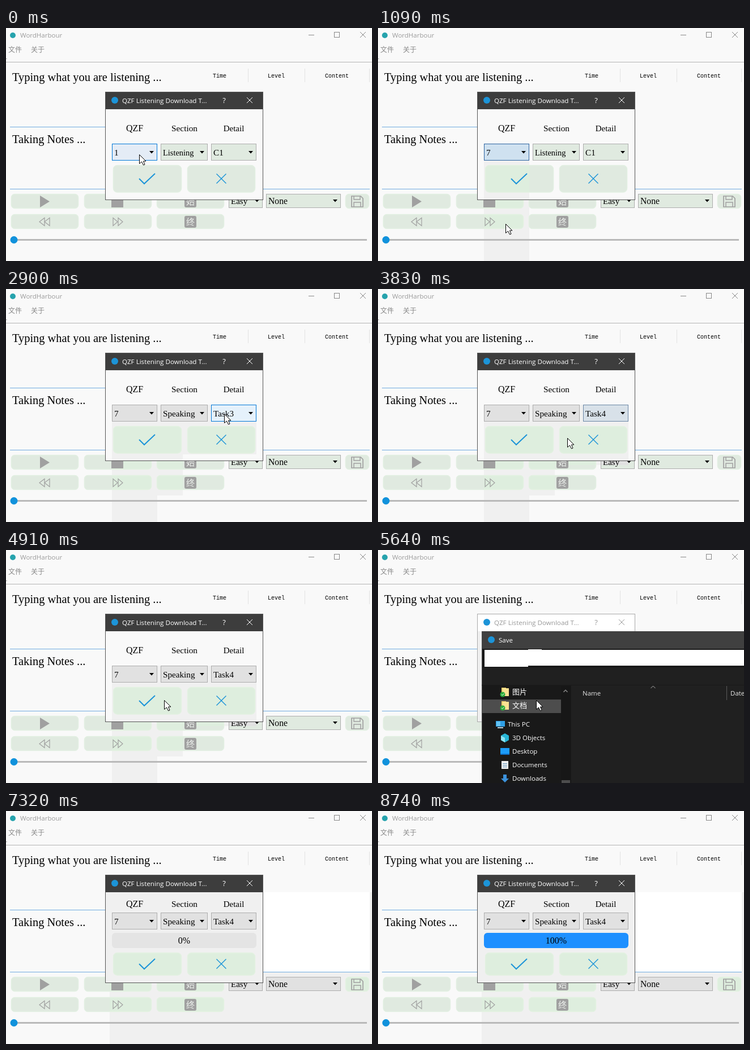
An HTML page with a canvas for the animation above (9120 ms loop, 646 by 413 pixels).

```html
<!DOCTYPE html>
<html lang="en">
<head>
<meta charset="utf-8">
<title>Download dialog</title>
<style>
  html, body { margin: 0; width: 100%; height: 100%; overflow: hidden; background: #f9f9f9; }
  canvas { display: block; }
</style>
</head>
<body>
<canvas id="stage" width="646" height="413"></canvas>
<script>
const c = document.getElementById('stage').getContext('2d');
const LOOP = 9120;
const SERIF = '"Liberation Serif", serif';
const SANS = '"Open Sans", "Noto Sans CJK SC", sans-serif';
const MONO = '"Liberation Mono", monospace';
const CJK = '"Noto Sans CJK SC", "Noto Sans CJK", sans-serif';
const BLUE = '#1c94d8';
const RULE = '#6fabe0';
const ROW = 18;

const FADED = { bg: '#f9f9f9', panel: '#f9f9f9', button: '#e0eae0', edge: '#e1efe1', combo: [224, 234, 224], hover: [228, 236, 246] };
const FRESH = { bg: '#f0f0f0', panel: '#ffffff', button: '#deeede', edge: '#e2f1e0', combo: [225, 225, 225], hover: [229, 241, 251] };

// areas repainted in full colour: start, x, y, w, h
const repaints = [
  [120, 187, 205, 80, 208],
  [1330, 187, 205, 125, 161],
  [1940, 189, 205, 253, 88],
  [3590, 189, 205, 253, 107],
  [5170, 175, 113, 279, 192],
  [7080, 183, 144, 463, 269]
];

// combo timing: hover, open, choose
const fields = [
  { x: 187, w: 80, label: 'QZF', size: 16, items: '1 2 3 4 5 6 7 8 9 10'.split(' '), pick: 6, on: 0, open: 120, done: 1090 },
  { x: 273, w: 83, label: 'Section', size: 15.3, items: ['Listening', 'Speaking'], pick: 1, on: 1330, open: 1450, done: 1940 },
  { x: 362, w: 80, label: 'Detail', size: 15, items: ['Task3', 'Task4', 'Task5', 'Task6'], pick: 1, on: 2660, open: 3010, done: 3590 }
];

// pointer stops: time, x, y
const stops = [
  [0, 235, 224], [120, 235, 224], [720, 225, 347], [1090, 225, 347], [1330, 300, 224],
  [1450, 300, 224], [1700, 303, 260], [1940, 303, 260], [2060, 310, 274], [2780, 385, 221],
  [3010, 385, 221], [3350, 388, 262], [3590, 388, 262], [4070, 279, 266], [5760, 279, 266],
  [6000, 478, 310], [6119, 478, 310], [6120, -40, 0], [7559, -40, 0], [7560, 633, 343],
  [7690, 622, 306], [8150, 615, 304], [8500, 475, 300], [8619, 475, 300], [8620, -40, 0], [LOOP, -40, 0]
];

const clamp = v => Math.max(0, Math.min(1, v));
const mix = (a, b, k) => a.map((v, i) => Math.round(v + (b[i] - v) * k));
const rgb = a => `rgb(${a})`;

function pointer(t) {
  const i = stops.findIndex((s, n) => t < stops[n + 1][0]);
  const [t0, ...a] = stops[i], [t1, ...b] = stops[i + 1];
  const held = Math.floor((t - t0) / 118) * 118;
  return mix(a, b, clamp(held / (t1 - t0)));
}

function rect(x, y, w, h, fill) {
  c.fillStyle = fill;
  c.fillRect(x, y, w, h);
}
function frame(x, y, w, h, color) {
  c.strokeStyle = color;
  c.lineWidth = 1;
  c.strokeRect(x + .5, y + .5, w - 1, h - 1);
}
function round(x, y, w, h, r, fill, edge) {
  c.beginPath();
  c.roundRect(x, y, w, h, r);
  c.fillStyle = fill;
  c.fill();
  if (edge) { c.strokeStyle = edge; c.lineWidth = 1.5; c.stroke(); }
}
function disc(x, y, r, fill) {
  c.beginPath();
  c.arc(x, y, r, 0, 7);
  c.fillStyle = fill;
  c.fill();
}
function trace(points, close) {
  c.beginPath();
  points.forEach(([x, y]) => c.lineTo(x, y));
  if (close) c.closePath();
}
function line(points, color, width = 1, close) {
  trace(points, close);
  c.strokeStyle = color;
  c.lineWidth = width;
  c.stroke();
}
function poly(points, fill) {
  trace(points, true);
  c.fillStyle = fill;
  c.fill();
}
function text(s, x, y, size, color = '#000', font = SERIF, align = 'left') {
  c.font = `${size}px ${font}`;
  c.fillStyle = color;
  c.textAlign = align;
  c.fillText(s, x, y);
}
function cross(x, y, r, color, width = 1) {
  line([[x - r, y - r], [x + r, y + r]], color, width);
  line([[x + r, y - r], [x - r, y + r]], color, width);
}
// dir: rotation in quarter turns, 0 points right
function chevron(x, y, r, dir, color, width = 1) {
  c.save();
  c.translate(x, y);
  c.rotate(dir * Math.PI / 2);
  line([[-r / 2, -r], [r / 2, 0], [-r / 2, r]], color, width);
  c.restore();
}

function combo(x, y, w, h, value, size, fill, edge) {
  rect(x, y, w, h, fill);
  frame(x, y, w, h, edge);
  text(value, x + 4, Math.floor(y + h / 2 + 6), size);
  const ax = x + w - 10, ay = Math.floor(y + h / 2);
  poly([[ax - 4, ay - 2], [ax + 4, ay - 2], [ax, ay + 2.5]], '#000');
}

function mainWindow(p, t) {
  rect(0, 0, 646, 413, p.bg);
  disc(12, 13, 5, '#26a3ad');
  text('WordHarbour', 25, 17, 11.5, '#9a9a9a', SANS);
  line([[534, 12.5], [544, 12.5]], '#888');
  frame(579, 7, 10, 10, '#888');
  cross(630, 12, 5, '#888');
  text('文件', 4, 43, 12, '#888', CJK);
  text('关于', 44, 43, 12, '#888', CJK);
  rect(0, 54, 2, 1, '#aaa');
  rect(0, 60, 646, 1, '#b4b4b4');

  rect(345, 61, 297, 224, p.panel);
  [['Time', 377], ['Level', 477], ['Content', 584]].forEach(([s, x]) => text(s, x, 88, 10, '#000', MONO, 'center'));
  [427, 527, 641].forEach(x => rect(x, 72, 1, 24, '#e2e2e2'));
  text('Typing what you are listening ...', 11, 94, 20.4);
  text('Taking Notes ...', 11, 204, 20.4);
  rect(7, 175, 338, 1, RULE);
  rect(7, 285, 635, 1, RULE);

  [294, 330].forEach(y => [9.5, 138.5, 266.5].forEach(x => round(x, y + .5, 118, 25, 6, p.button, p.edge)));
  round(599.5, 294.5, 41, 25, 6, p.button, p.edge);
  const grey = '#a0a0a0';
  poly([[60, 297], [77, 307.5], [60, 318]], grey);
  rect(186, 297, 21, 21, grey);
  [['始', 297], ['终', 333]].forEach(([s, y]) => {
    round(315, y, 21, 21, 3, grey);
    text(s, 325.5, y + 16, 15, '#eef2ee', CJK, 'center');
  });
  [0, 9].forEach(d => {
    line([[68 + d, 336.5], [68 + d, 350.5], [59 + d, 343.5]], grey, 1.2, true);
    line([[189 + d, 336.5], [189 + d, 350.5], [197 + d, 343.5]], grey, 1.2, true);
  });
  line([[610, 298], [626, 298], [630, 302], [630, 317], [610, 317]], grey, 1.7, true);
  line([[614, 298], [614, 304], [625, 304], [625, 298]], grey, 1.5);
  line([[614, 317], [614, 309], [626, 309], [626, 317]], grey, 1.5);

  combo(393, 294, 60, 25, 'Easy', 15, rgb(p.combo), '#adadad');
  const glow = t < 8270 ? 0 : clamp((8740 - t) / 300);
  combo(459, 294, 132, 25, 'None', 15.7, rgb(mix(p.combo, p.hover, glow)), rgb(mix([173, 173, 173], [0, 120, 215], glow)));
  rect(10, 374, 627, 3, '#b9b9b9');
  disc(14, 375.5, 6.5, '#1192dc');
}

function field(f, y, p, t) {
  const glow = t < f.on ? 0 : t < f.done ? 1 : clamp(1 - (t - f.done) / 500);
  const lit = t < f.open ? p.hover : [207, 225, 240];
  const edge = t < f.open ? [0, 120, 215] : [45, 100, 160];
  let value = f.items[t < f.done ? 0 : f.pick];
  if (f.label === 'Detail' && t < 1940) value = 'C1';
  combo(f.x, y, f.w, 30, value, value === 'Listening' ? 14.4 : 15.2, rgb(mix(p.combo, lit, glow)), rgb(mix([173, 173, 173], edge, glow)));
}

function dialog(p, t) {
  const active = t < 5170 || t >= 7320;
  const loading = t >= 7320;
  const shift = loading ? 25 : 0;
  rect(175, 113, 279, 192, p.bg);
  rect(175, 113, 279, 31, active ? '#3d3d3d' : '#fff');
  frame(175, 113, 279, 192, active ? '#555' : '#aaa');
  const ink = active ? '#fff' : '#999';
  disc(192, 128, 6, BLUE);
  text('QZF Listening Download T...', 205, 132.5, 11.65, ink, SANS);
  text('?', 385, 132.5, 13, ink, SANS, 'center');
  cross(430, 128, 5, ink, 1);

  fields.forEach((f, i) => {
    text(f.label, [227, 315, 402][i], loading ? 170 : 183, f.size, '#000', SERIF, 'center');
    field(f, 205 - shift, p, t);
  });
  const top = loading ? 251.5 : 243.5, mid = loading ? 271 : 267;
  const pressed = t >= 4070 && t < 4910;
  round(189.5, top, 120, 291 - top, 7, pressed ? '#d9ecd9' : p.button, p.edge);
  round(320.5, top, 119, 291 - top, 7, p.button, p.edge);
  line([[235, mid], [244, mid + 9], [263, mid - 9]], BLUE, 2);
  cross(380, mid, 8.5, BLUE, 1.4);

  if (loading) {
    const done = t < 7560 ? 0 : t < 7690 ? 35 : t < 7810 ? 70 : 100;
    round(187, 216, 255, 27, 6, '#e4e4e4');
    if (done) round(187, 216, 2.55 * done, 27, 6, '#1e90ff');
    text(done + '%', 314.5, 235, 16, '#000', SERIF, 'center');
  }
}

function popup(f, y) {
  const h = f.items.length * ROW + 2;
  const over = Math.max(0, Math.min(f.items.length - 1, Math.floor((y - 236) / ROW)));
  rect(f.x, 235, f.w, h, '#fff');
  f.items.forEach((s, i) => {
    if (i === over) rect(f.x + 1, 236 + i * ROW, f.w - 2, ROW, '#0078d7');
    text(s, f.x + 4, 250 + i * ROW, 15.2, i === over ? '#fff' : '#000');
  });
  frame(f.x, 235, f.w, h, '#646464');
}

function folder(x, y) {
  rect(x, y, 8, 15, '#f3cf6b');
  rect(x + 2, y + 1, 11, 14, '#fbe293');
}

function navIcon(kind, y) {
  if (kind === 'folder') {
    folder(218, y - 8);
    disc(220, y + 4, 4.5, '#2eab3c');
    line([[218, y + 4], [219.5, y + 5.5], [222.5, y + 2.5]], '#fff');
  } else if (kind === 'pc') {
    rect(208, y - 6, 16, 10, '#2f9fe6');
    rect(209, y - 5, 7, 8, '#63c3f5');
    rect(211, y + 5, 10, 2, '#bcd3e0');
  } else if (kind === 'cube') {
    poly([[224, y - 8], [231, y - 4], [231, y + 4], [224, y + 8], [217, y + 4], [217, y - 4]], '#27b5d6');
    poly([[217, y - 4], [224, y], [224, y + 8], [217, y + 4]], '#8fe3f2');
  } else if (kind === 'desk') {
    rect(216, y - 6, 16, 12, '#1c9cfa');
    rect(216, y + 4, 16, 2, '#0d6fc8');
  } else if (kind === 'doc') {
    rect(218, y - 7, 12, 14, '#f2f2f2');
    [-3, 0, 3].forEach(d => rect(220, y + d, 8, 1, '#5a8fb8'));
  } else {
    poly([[221, y - 7], [227, y - 7], [227, y], [231, y], [224, y + 7], [217, y], [221, y]], '#3c92dc');
  }
}

function saveDialog(t) {
  const painted = t >= 5880;
  c.globalAlpha = t < 5410 ? .4 : t < 5530 ? .8 : 1;
  rect(183, 144, 463, 269, '#202020');
  rect(183, 144, 463, 31, '#404040');
  rect(183, 175, 463, 34, '#191919');
  rect(183, 240, 158, 173, '#191919');
  rect(183, 144, 1, 269, '#4a4a4a');
  disc(200, 159, 6, BLUE);
  text('Save', 213, 163.5, 11.5, '#fff', SANS);

  if (painted) {
    [[203, -1], [233, 1]].forEach(([x, d]) => {
      line([[x - 6 * d, 192], [x + 6 * d, 192]], '#8a8a8a', 1.5);
      chevron(x + 4 * d, 192, 4.5, 1 - d, '#8a8a8a', 1.5);
    });
    chevron(257, 191, 3, 1, '#8a8a8a', 1.5);
    line([[277, 198], [277, 186]], '#fff', 1.8);
    chevron(277, 188, 5, 3, '#fff', 1.8);
    frame(290, 181, 370, 22, '#555');
    folder(295, 184);
    chevron(316, 192, 3, 2, '#aaa');
    chevron(320, 192, 3, 2, '#aaa');
    [['release', 330], ['Json', 389], ['QZF', 435], ['QZF7', 481]].forEach(([s, x]) => text(s, x, 195.5, 11.5, '#fff', SANS));
    [377, 423, 469].forEach(x => chevron(x, 192, 3, 0, '#ccc'));
    text('Organize', 202, 229, 11.5, '#fff', SANS);
    poly([[254, 223], [263, 223], [258.5, 228]], '#bbb');
    text('New folder', 293, 229, 11.5, '#fff', SANS);
  } else {
    rect(188, 177, 77, 30, '#fff');
    rect(265, 176, 24, 29, '#fff');
    rect(289, 177, 357, 28, '#fff');
    rect(183, 239, 463, 1, '#191919');
  }

  if (t < 6000) rect(184, 265, 139, 24, '#4d4d4d');
  [['图片', 252, 'folder'], ['文档', 276, 'folder'], ['This PC', 309, 'pc'], ['3D Objects', 333, 'cube'],
   ['Desktop', 357, 'desk'], ['Documents', 381, 'doc'], ['Downloads', 405, 'down']].forEach(([s, y, kind]) => {
    navIcon(kind, y);
    const chinese = kind === 'folder';
    text(s, kind === 'pc' ? 229 : 237, y + 4, chinese ? 13 : 11.5, '#fff', chinese ? CJK : SANS);
  });
  if (t >= 5760) {
    c.globalAlpha = clamp((6840 - t) / 720);
    chevron(195, 310, 3, 1, '#ddd');
    c.globalAlpha = 1;
  }
  rect(323, 241, 17, 172, '#171717');
  chevron(331, 250, 3.5, 3, '#888', 1.5);
  rect(324, 408, 15, 5, '#4d4d4d');
  text('Name', 361, 257.5, 11.5, '#e4e4e4', SANS);
  chevron(485.5, 243, 4, 3, '#aaa');
  rect(615, 241, 1, 25, '#5a5a5a');
  text('Date', 622, 257.5, 11.5, '#e4e4e4', SANS);
  c.globalAlpha = 1;
}

function arrow(x, y) {
  const shape = [[0, 0], [0, 16], [4, 12.5], [7, 18.5], [9.5, 17.5], [7, 11.5], [11.5, 11.5]].map(([a, b]) => [x + a + .5, y + b + .5]);
  poly(shape, '#fff');
  line(shape, '#000', 1, true);
}

function draw(t) {
  const [x, y] = pointer(t);
  mainWindow(FADED, t);
  dialog(FADED, t);
  c.save();
  c.beginPath();
  repaints.filter(r => t >= r[0]).forEach(([, ...box]) => c.rect(...box));
  c.clip();
  mainWindow(FRESH, t);
  dialog(FRESH, t);
  c.restore();
  fields.filter(f => t >= f.open && t < f.done).forEach(f => popup(f, y));
  if (t >= 5290 && t < 7080) saveDialog(t);
  arrow(x, y);
}

const start = performance.now();
function tick() {
  draw((performance.now() - start) % LOOP);
  requestAnimationFrame(tick);
}
tick();
</script>
</body>
</html>
```
